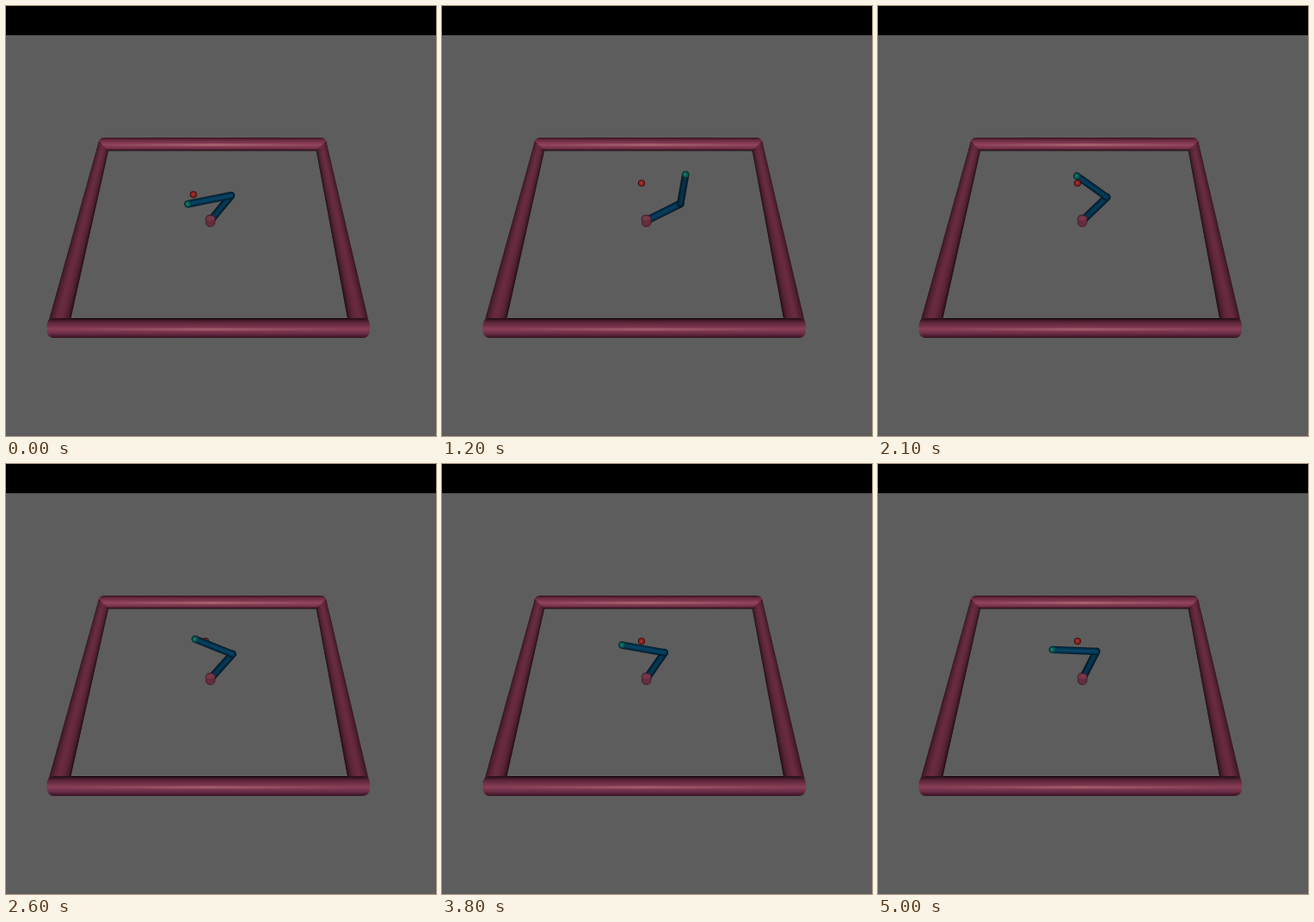
An HTML page that plays this animation: 500x500 px, repeating every 5.1 s.

```html
<!DOCTYPE html>
<html lang="en">
<head>
<meta charset="utf-8">
<title>Two-link arm</title>
<style>
html, body { margin: 0; width: 100%; height: 100%; overflow: hidden; background: #5d5d5d; }
svg { display: block; width: 100vw; height: 100vh; }
</style>
</head>
<body>
<svg id="stage" viewBox="0 0 500 500">
  <defs>
    <linearGradient id="back" x2="0" y2="1">
      <stop offset="0" stop-color="#341320"/>
      <stop offset=".2" stop-color="#6b2a42"/>
      <stop offset=".55" stop-color="#91445c"/>
      <stop offset=".8" stop-color="#76324a"/>
      <stop offset="1" stop-color="#1c0810"/>
    </linearGradient>
    <linearGradient id="front" x2="0" y2="1">
      <stop offset="0" stop-color="#200b14"/>
      <stop offset=".2" stop-color="#5a2439"/>
      <stop offset=".55" stop-color="#883e56"/>
      <stop offset=".75" stop-color="#6f2f49"/>
      <stop offset="1" stop-color="#351323"/>
    </linearGradient>
    <linearGradient id="sheen">
      <stop offset="0" stop-color="#c88c8c" stop-opacity="0"/>
      <stop offset=".5" stop-color="#c88c8c" stop-opacity=".4"/>
      <stop offset="1" stop-color="#c88c8c" stop-opacity="0"/>
    </linearGradient>
  </defs>
  <rect width="500" height="500" fill="#5d5d5d"/>
  <rect width="500" height="34" fill="#000"/>
  <rect x="107" y="153" width="266" height="15.5" rx="7" fill="url(#back)"/>
  <rect x="125" y="160" width="230" height="3" fill="url(#sheen)"/>
  <g id="sides"></g>
  <rect x="47.5" y="363" width="375.5" height="23" rx="8" fill="url(#front)"/>
  <rect x="75" y="374.5" width="322" height="3" fill="url(#sheen)"/>
  <path d="M76 363.5H397" stroke="#0c0407" stroke-width="1.2"/>
  <g id="scene">
    <g id="arm">
      <g id="upper"></g>
      <g id="lower"></g>
      <g id="tip">
        <circle r="4.2" fill="#05302f"/>
        <circle r="3.2" fill="#0a5852"/>
        <circle cx="-.6" cy="-.3" r="1.5" fill="#14806f"/>
      </g>
      <path d="M232.2 246.5L234.5 243.3H240.5L243.3 246.5L242.6 254L240 256.3H235L232.8 254Z" fill="#652d3e" stroke="#3a1824" stroke-width=".8"/>
      <ellipse cx="237.7" cy="247" rx="4.3" ry="2.8" fill="#753848"/>
    </g>
    <g id="goal">
      <circle r="4.1" fill="#3a0c0b"/>
      <circle r="3.2" fill="#86211c"/>
      <circle cx="-.3" cy="-.2" r="1.6" fill="#a2342b"/>
    </g>
  </g>
</svg>
<script>
const NS = 'http://www.w3.org/2000/svg';
const el = id => document.getElementById(id);
const LOOP = 5100, STEP = 100;

function add(parent, tag, attrs) {
  const node = document.createElementNS(NS, tag);
  for (const k in attrs) node.setAttribute(k, attrs[k]);
  parent.appendChild(node);
  return node;
}

const mix = (a, b, k) => a + (b - a) * k;

// Tapered side wall from outer to inner edge, mitred at the back corner
function sideWall(topOut, topIn, botOut, botIn) {
  const n = 28, peak = 0.4;
  const point = (k, y) => `${mix(mix(topOut, topIn, k), mix(botOut, botIn, k), (y - 161) / 209)} ${y}`;
  const top = k => mix(157, 168, k);
  for (let i = 0; i < n; i++) {
    const k = i / n, end = Math.min(1, (i + 1.6) / n), c = (i + 0.5) / n;
    const light = c < peak
      ? mix(0.3, 1, Math.sqrt(c / peak))
      : Math.sqrt(1 - ((c - peak) / (1 - peak)) ** 2);
    const rgb = [mix(10, 106, light), mix(3, 42, light), mix(6, 64, light)].map(Math.round);
    add(el('sides'), 'path', {
      d: `M${point(k, top(k))}L${point(end, top(end))}L${point(end, 370)}L${point(k, 370)}Z`,
      fill: `rgb(${rgb})`
    });
  }
}
sideWall(106.8, 120.7, 48.5, 73.9);
sideWall(373.2, 359.4, 422.5, 398.3);

// Colour and width of the nested strokes of one link
const layers = [[[3, 24, 38], 9.2], [[4, 48, 75], 7.2], [[7, 66, 98], 3.4]];
const makeLink = id => layers.map(() => add(el(id), 'line', { 'stroke-linecap': 'round' }));
const upper = makeLink('upper'), lower = makeLink('lower');

function setLink(lines, a, b, dir) {
  const size = 1 - (249.5 - (a[1] + b[1]) / 2) * 0.0025;
  const light = mix(0.72, 1, Math.abs(Math.cos(dir)));
  lines.forEach((line, i) => {
    const [rgb, width] = layers[i];
    line.setAttribute('x1', a[0]);
    line.setAttribute('y1', a[1]);
    line.setAttribute('x2', b[0]);
    line.setAttribute('y2', b[1]);
    line.setAttribute('stroke', `rgb(${rgb.map(c => Math.round(c * light))})`);
    line.setAttribute('stroke-width', width * size);
  });
}

// Floor coordinates (-1..1) to the screen
function project(u, v) {
  const w = 1 + 0.1636 * v;
  return [(146 * u + 40.9 * v + 237.8) / w, (249.5 - 63.3 * v) / w];
}

// Time, shoulder angle, forearm angle (degrees, both absolute)
const keys = [
  [100, 3, 5], [700, 19.3, 44.5], [1600, 46, 108.6], [2100, 53.9, 133.5],
  [3100, 60.8, 159.8], [3800, 64.4, 165.3], [5000, 70.6, 176.6]
];

function slope(i, c) {
  const d = j => (keys[j + 1][c] - keys[j][c]) / (keys[j + 1][0] - keys[j][0]);
  if (i === 0) return d(0) * 0.7;
  if (i === keys.length - 1) return d(i - 1);
  const a = d(i - 1), b = d(i);
  return 2 * a * b / (a + b);
}

function angle(t, c) {
  let i = 0;
  while (i < keys.length - 2 && t > keys[i + 1][0]) i++;
  const a = keys[i], b = keys[i + 1], h = b[0] - a[0], s = (t - a[0]) / h;
  const s2 = s * s, s3 = s2 * s;
  return a[c] * (2 * s3 - 3 * s2 + 1) + b[c] * (3 * s2 - 2 * s3)
    + h * (slope(i, c) * (s3 - 2 * s2 + s) + slope(i + 1, c) * (s3 - s2));
}

const place = (id, p) => el(id).setAttribute('transform', `translate(${p[0]} ${p[1]})`);

function render(t) {
  const first = t < 100;
  const rad = Math.PI / 180;
  const a = (first ? 60.2 : angle(t, 1)) * rad;
  const b = (first ? 196 : angle(t, 2)) * rad;
  const goal = first ? [218, 219.3] : [232, 206];
  const u = 0.338 * Math.cos(a), v = 0.338 * Math.sin(a);
  const elbow = project(u, v);
  const tip = project(u + 0.37 * Math.cos(b), v + 0.37 * Math.sin(b));
  setLink(upper, project(0, 0), elbow, a);
  setLink(lower, elbow, tip, b);
  place('tip', tip);
  place('goal', goal);

  // The nearer of goal and forearm is drawn last
  const k = Math.min(1, Math.max(0, (goal[0] - elbow[0]) / (tip[0] - elbow[0])));
  const goalBehind = mix(elbow[1], tip[1], k) > goal[1];
  const last = el(goalBehind ? 'arm' : 'goal');
  if (el('scene').lastElementChild !== last) el('scene').appendChild(last);
}

const start = performance.now();
function tick() {
  const t = (performance.now() - start) % LOOP;
  render(Math.floor(t / STEP) * STEP);
  requestAnimationFrame(tick);
}
render(0);
requestAnimationFrame(tick);
</script>
</body>
</html>
```
